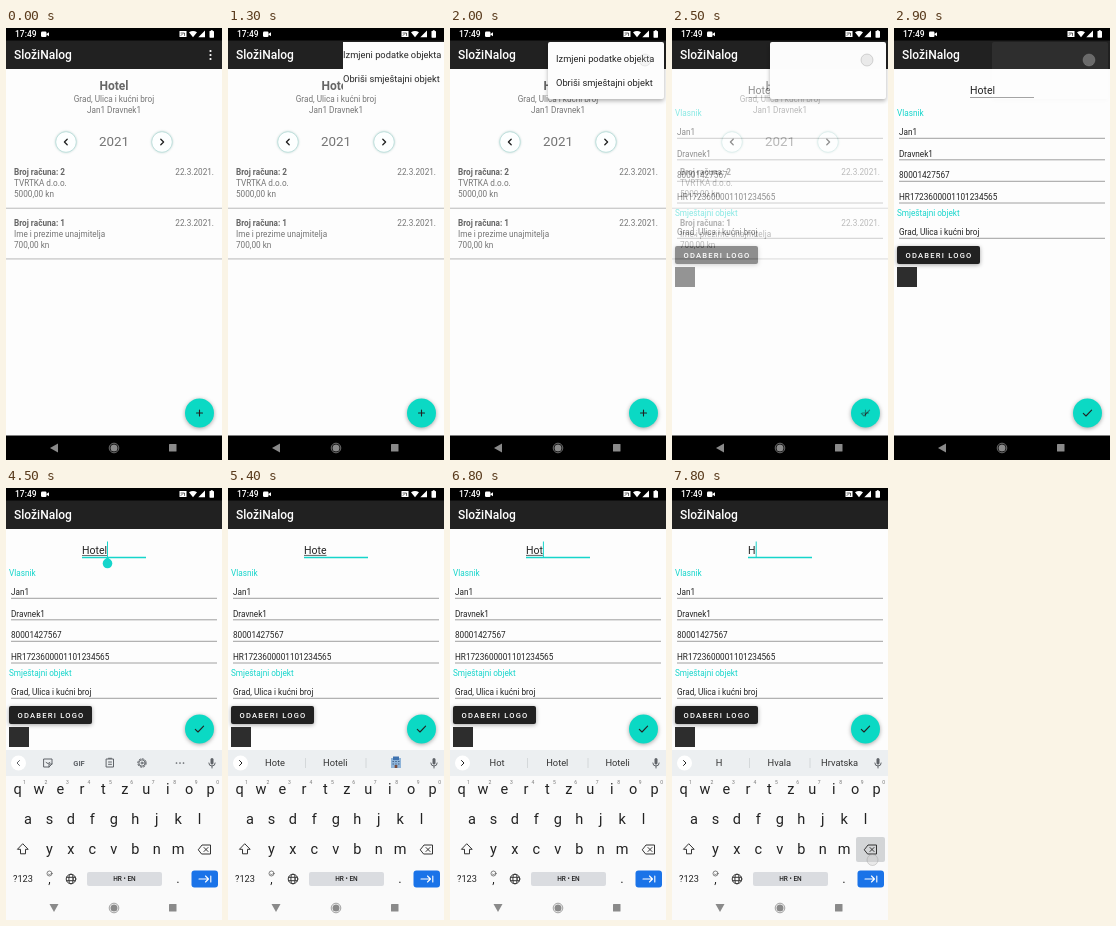
Animation of 216x432 px, one loop 8000 ms. Source, as an HTML page:

```html
<!DOCTYPE html>
<html lang="hr">
<head>
<meta charset="utf-8">
<title>SložiNalog</title>
<style>
html, body { margin: 0; width: 100%; height: 100%; overflow: hidden; background: #fff; }
svg.layer { position: absolute; left: 0; top: 0; width: 216px; height: 432px; overflow: hidden; }
text { font: 8.2px Roboto, Arial, sans-serif; fill: #222; }
.old text { fill: #757575; }
.old .b { font-weight: 700; fill: #666; }
.mid { text-anchor: middle; }
.end { text-anchor: end; }
.teal { fill: #16d5cb; }
.line { fill: none; stroke: #222; stroke-linecap: round; stroke-linejoin: round; }
.shade { filter: drop-shadow(0 1.5px 2px rgba(0,0,0,.35)); }
.ring { fill: #fdffff; stroke: #b5dcd8; stroke-width: .8; filter: drop-shadow(0 .8px .8px rgba(0,90,80,.25)); }
.anim { animation: 8s linear infinite; }

#form { animation-name: form; }
@keyframes form { 0%, 28.75% { opacity: 0 } 33.75%, 100% { opacity: 1 } }

#fab { animation-name: lift; animation-timing-function: step-end; }
@keyframes lift { 0% { transform: none } 56.25%, 100% { transform: translateY(-144px) } }

#focus { animation-name: focus; }
@keyframes focus { 0%, 44% { opacity: 0 } 46.25%, 100% { opacity: 1 } }

#keys { animation-name: keys; }
@keyframes keys {
  0%, 51.25% { opacity: 0; transform: translateY(52px) }
  52.5% { opacity: .52; transform: translateY(42px); animation-timing-function: ease-out }
  56.25%, 100% { opacity: 1; transform: none }
}

#menu {
  position: absolute; left: 98px; top: 14px; width: 116px; height: 57px;
  background: #fdfdfd; border-radius: 2px; box-shadow: 0 2px 4px rgba(0,0,0,.3);
  font: 9.3px/24px Roboto, Arial, sans-serif; color: #222; white-space: nowrap;
  animation-name: menu;
}
#menu div { position: absolute; left: 8px; top: 5px; animation-name: items; }
@keyframes menu {
  0%, 14% { opacity: 0; transform: translate(18px, -8px); clip-path: inset(8px 0 36px 40px) }
  16.25% { opacity: 1; transform: translate(9px, -4px); clip-path: inset(4px 0 4px 9px) }
  18.75%, 31.25% { opacity: 1; transform: none; clip-path: inset(0 -4px -7px -5px) }
  35% { opacity: .09; transform: none; clip-path: inset(0 -4px -7px -5px) }
  38.75%, 100% { opacity: 0; transform: none; clip-path: inset(0 -4px -7px -5px) }
}
@keyframes items { 0%, 28% { opacity: 1 } 30.6%, 100% { opacity: 0 } }

.touch { fill: rgba(205,205,205,.38); stroke: rgba(150,150,150,.45); stroke-width: .8; }
#tapMore { animation-name: tapMore; }
@keyframes tapMore { 0%, 7% { opacity: 0 } 8%, 12% { opacity: 1 } 14.5%, 100% { opacity: 0 } }
#tapItem { animation-name: tapItem; }
@keyframes tapItem { 0%, 24.5% { opacity: 0 } 25.5%, 36.25% { opacity: 1 } 38.75%, 100% { opacity: 0 } }
#tapField { animation-name: tapField; }
@keyframes tapField { 0%, 41% { opacity: 0 } 41.5%, 43.75% { opacity: 1 } 46%, 100% { opacity: 0 } }
</style>
</head>
<body>
<svg class="layer" viewBox="0 0 216 432">
  <rect width="216" height="432" fill="#fdfdfd"/>
  <rect width="216" height="13" fill="#000"/>
  <rect y="12.5" width="216" height="28.5" fill="#212121"/>
  <text x="9" y="9.3" style="font-size:8.5px;font-weight:500;fill:#fff">17:49</text>
  <g fill="#fff">
    <rect x="35" y="3.5" width="5.5" height="5.5" rx="1.2"/><path d="M40 6.2l3-2v4z"/>
    <path d="M173.500 3h7v6h-7zM183 4.300q4-2.600 8 0l-4 5zM199 2.500v6.700h-6.700z"/>
    <rect x="203.500" y="3" width="4.500" height="6.700" rx=".6"/><rect x="204.800" y="2.200" width="1.900" height="1"/>
  </g>
  <path d="M175 7.500l1.500-1.500M175 5h3.500v2.500" class="line" style="stroke:#000;stroke-width:.6"/>
  <text x="8" y="31" style="font-size:12px;font-weight:500;fill:#fff">SložiNalog</text>

  <g class="old">
    <g style="fill:#fff"><circle cx="204.500" cy="23" r="1.100"/><circle cx="204.500" cy="27" r="1.100"/><circle cx="204.500" cy="31" r="1.100"/></g>
    <text class="mid b" x="108" y="62" style="font-size:12px">Hotel</text>
    <text class="mid" x="108" y="74">Grad, Ulica i kućni broj</text>
    <text class="mid" x="108" y="84.500">Jan1 Dravnek1</text>
    <text class="mid" x="108" y="118" style="font-size:13.400px">2021</text>
    <circle class="ring" cx="60" cy="114" r="10.300"/><circle class="ring" cx="156" cy="114" r="10.300"/>
    <path class="line" d="M61.200 111.200l-2.800 2.800 2.800 2.800M154.800 111.200l2.800 2.800-2.800 2.800" style="stroke-width:1.300"/>
    <g id="bills"></g>
    <g class="shade"><circle cx="193.500" cy="385" r="14.500" fill="#0bd9c4"/></g>
    <path class="line" d="M190.500 385h6M193.500 382v6" style="stroke-width:1.100"/>
  </g>

  <g id="form" class="anim">
    <rect x="198" y="14" width="14" height="26" fill="#212121"/>
    <rect y="41" width="216" height="367" fill="#fdfdfd"/>
    <path d="M76 69.500h64" stroke="#888" stroke-width=".8"/>
    <path id="focus" class="anim" d="M76 69.500h64" stroke="#16d5cb" stroke-width="1.300"/>
    <g id="words"></g>
    <g id="handle" class="teal"><circle cx="101.500" cy="75.500" r="4.800"/><path d="M101.500 69l3.400 3.200h-6.800z"/></g>
    <text class="teal" x="3" y="88">Vlasnik</text>
    <text class="teal" x="3" y="188">Smještajni objekt</text>
    <g id="fields"></g>
    <rect class="shade" x="3" y="218" width="83" height="18" rx="2" fill="#212121"/>
    <text x="11.500" y="230" style="font-size:7.600px;font-weight:500;letter-spacing:1.200px;fill:#fff">ODABERI LOGO</text>
    <rect x="3" y="239" width="20" height="20" fill="#2d2d2d"/>
    <g id="fab" class="anim">
      <g class="shade"><circle cx="193.500" cy="385" r="14.500" fill="#0bd9c4"/></g>
      <path class="line" d="M189.300 385.300l2.700 2.700 5.600-5.800" style="stroke-width:1.100"/>
    </g>
  </g>

  <rect y="407.500" width="216" height="25" fill="#000"/>

  <g id="keys" class="anim">
    <rect y="262" width="216" height="224" fill="#fafafa"/>
    <rect y="262" width="216" height="26" fill="#eceff1"/>
    <circle cx="12.500" cy="275" r="7.500" fill="#fff"/>
    <g class="line" style="stroke:#5f6368;stroke-width:1">
      <g id="tools">
        <path d="M13.500 272.500l-2.500 2.500 2.500 2.500"/>
        <path d="M38 271h8v5l-3 3h-5zM46 276h-3v3M40 274.500q2 2.500 4 0"/>
        <path d="M100.500 271h7v8h-7zM102.500 270.300h3M102.500 274h3M102.500 276.300h3"/>
        <circle cx="136" cy="275" r="3.200"/><circle cx="136" cy="275" r="4.200" stroke-dasharray="1.600 1.700"/><circle cx="136" cy="275" r="1"/>
        <path d="M170.500 275h0M174 275h0M177.500 275h0" style="stroke-width:1.700"/>
        <text class="mid" x="73" y="277.700" style="font-size:7.500px;font-weight:700;fill:#5f6368;stroke:none">GIF</text>
      </g>
      <path id="more" d="M11.500 272.500l2.500 2.500-2.500 2.500" style="stroke:#222"/>
      <path d="M206 271.500v3.500" style="stroke-width:3"/><path d="M202.800 275q0 3 3.200 3t3.200-3M206 278v2"/>
    </g>
    <g id="hints"></g>
    <rect id="press" x="184" y="349" width="29" height="25" rx="2" fill="#d3d5d7"/>
    <g id="letters"></g>
    <g class="line" style="stroke:#333;stroke-width:1">
      <path d="M17 356l5.200 5.300h-2.700v4.500h-5v-4.500h-2.700z"/>
      <path d="M192.500 361.500l3.500-4.500h8.500v9h-8.500zM198 359.500l4 4M202 359.500l-4 4"/>
      <circle cx="65" cy="391" r="4.800"/><ellipse cx="65" cy="391" rx="2.100" ry="4.800"/><path d="M60.600 389.300h8.800M60.600 392.700h8.800"/>
      <circle cx="43.500" cy="385.500" r="2.500" style="stroke-width:.6"/><path d="M42.500 386.200q1 1 2 0" style="stroke-width:.6"/>
    </g>
    <text class="mid" x="17" y="394" style="font-size:9.200px">?123</text>
    <text class="mid" x="43.500" y="395" style="font-size:12px">,</text>
    <rect x="81" y="384" width="75" height="14" rx="2" fill="#dadce0"/>
    <text class="mid" x="118.500" y="393.400" style="font-size:6.500px;font-weight:500">HR • EN</text>
    <text class="mid" x="172" y="395" style="font-size:13px">.</text>
    <rect x="185.500" y="382.500" width="26.500" height="17" rx="3" fill="#1a73e8"/>
    <path class="line" d="M193 391h9M199.500 388l3 3-3 3M204.800 388v6" style="stroke:#fff;stroke-width:1.100"/>
  </g>

  <g fill="#8a8a8a">
    <path id="back" d="M44 420l8-4.500v9z"/>
    <path id="hide" d="M43.500 416h9l-4.500 8z"/>
    <circle cx="108" cy="420" r="3.500"/><circle cx="108" cy="420" r="4.800" fill="none" stroke="#8a8a8a" stroke-width=".8"/>
    <rect x="163" y="416" width="7.500" height="7.500" rx=".5"/>
  </g>
</svg>

<div id="menu" class="anim"><div class="anim">Izmjeni podatke objekta<br>Obriši smještajni objekt</div></div>

<svg class="layer" viewBox="0 0 216 432">
  <circle id="tapMore" class="touch anim" cx="204" cy="28" r="6"/>
  <circle id="tapItem" class="touch anim" cx="195" cy="32" r="6"/>
  <circle id="tapField" class="touch anim" cx="125" cy="65" r="6"/>
  <circle id="tapErase" class="touch" cx="200.500" cy="372" r="5.500"/>
</svg>

<script>
const LOOP = 8000;
const $ = id => document.getElementById(id);
const label = (x, y, s, cls = '', style = '') =>
  `<text x="${x}" y="${y}" class="${cls}" style="${style}">${s}</text>`;

const bill = (y, no, who, sum) =>
  label(8, y, 'Broj računa: ' + no, 'b') + label(208, y, '22.3.2021.', 'end') +
  label(8, y + 11.2, who) + label(8, y + 22.4, sum) +
  `<rect y="${y + 32.6}" width="216" height="1.4" fill="#ccc"/>`;
$('bills').innerHTML = bill(147, 2, 'TVRTKA d.o.o.', '5000,00 kn') +
  bill(197.6, 1, 'Ime i prezime unajmitelja', '700,00 kn');

const fields = [[107, 'Jan1'], [128.5, 'Dravnek1'], [150, '80001427567'],
  [171.7, 'HR1723600001101234565'], [207, 'Grad, Ulica i kućni broj']];
$('fields').innerHTML = fields.map(([y, s]) =>
  label(5, y, s) + `<path d="M5 ${y + 3.3}h206" stroke="#888" stroke-width=".8"/>`).join('');

// typed word, caret x, start, end, suggestions
const words = [
  ['Hotel', 101.5, 0, 5200, ['Hotel', 'Hoteli', '']],
  ['Hote', 99, 5200, 6500, ['Hote', 'Hoteli', '']],
  ['Hot', 93.4, 6500, 7200, ['Hot', 'Hotel', 'Hoteli']],
  ['Ho', 90, 7200, 7700, ['Ho', 'Hoće', 'Hoću']],
  ['H', 84.2, 7700, LOOP, ['H', 'Hvala', 'Hrvatska']]
];
const hotelIcon = '<rect x="163" y="270" width="10" height="10" fill="#8fb4d9"/>' +
  '<rect x="165" y="268.500" width="6" height="3.500" fill="#3f72af"/>' +
  '<path d="M164.500 273.500h7M164.500 276h7" stroke="#3c5f86" stroke-dasharray="1.400 1.400"/>' +
  '<rect x="166.700" y="277" width="2.600" height="3" fill="#7a4b3a"/>';

$('words').innerHTML = words.map(([s, x], i) =>
  `<g id="word${i}">${label(76, 65.5, s, '', 'font-size:10.5px')}` +
  (s.length > 1 ? `<path id="under${i}" d="M76 67.400H${x - .5}" stroke="#222" stroke-width=".7"/>` : '') +
  `<rect id="caret${i}" x="${x - .5}" y="53.500" width="1" height="16" class="teal"/></g>`).join('');

$('hints').innerHTML = words.map(([, , , , list], i) =>
  `<g id="hint${i}">` + list.map((s, k) => s
    ? label(47 + 60.3 * k, 278.3, s, 'mid', 'font-size:9.3px;fill:#333') : hotelIcon).join('') +
  '<path d="M77.500 270v10M138 270v10" stroke="#cfd2d5" stroke-width=".8"/></g>').join('');

const row = (s, x, y) => [...s].map((c, i) =>
  label(x + 21.45 * i, y, c, 'mid', 'font-size:14.5px')).join('');
$('letters').innerHTML = row('qwertzuiop', 11.5, 305.5) + row('asdfghjkl', 22, 335.5) +
  row('yxcvbnm', 43.5, 365.5) + [...'1234567890'].map((c, i) =>
    label(18.5 + 21.45 * i, 295.5, c, 'mid', 'font-size:5px;fill:#777')).join('');

// hard on/off within the loop
let css = '';
function show(id, ...spans) {
  const steps = spans.map(([a, b]) =>
    `${a / LOOP * 100}%{opacity:1}${b / LOOP * 100}%{opacity:0}`).join('');
  css += `@keyframes ${id}{0%{opacity:0}${steps}}#${id}{animation:${id} ${LOOP}ms step-end infinite}`;
}
words.forEach(([, , from, to], i) => {
  show('word' + i, [from, to]);
  show('hint' + i, [Math.max(from, 4600), to]);
});
show('under0', [3800, LOOP]);
show('caret0', [3600, LOOP]);
show('caret1', [5200, 5400], [5900, LOOP]);
show('handle', [3600, 5100]);
show('tools', [0, 4600]);
show('more', [4600, LOOP]);
show('back', [0, 4200]);
show('hide', [4200, LOOP]);
const presses = [[5100, 5400], [6400, 6800], [7100, 7400], [7600, LOOP]];
show('press', ...presses);
show('tapErase', ...presses);
document.head.appendChild(document.createElement('style')).textContent = css;
</script>
</body>
</html>
```
